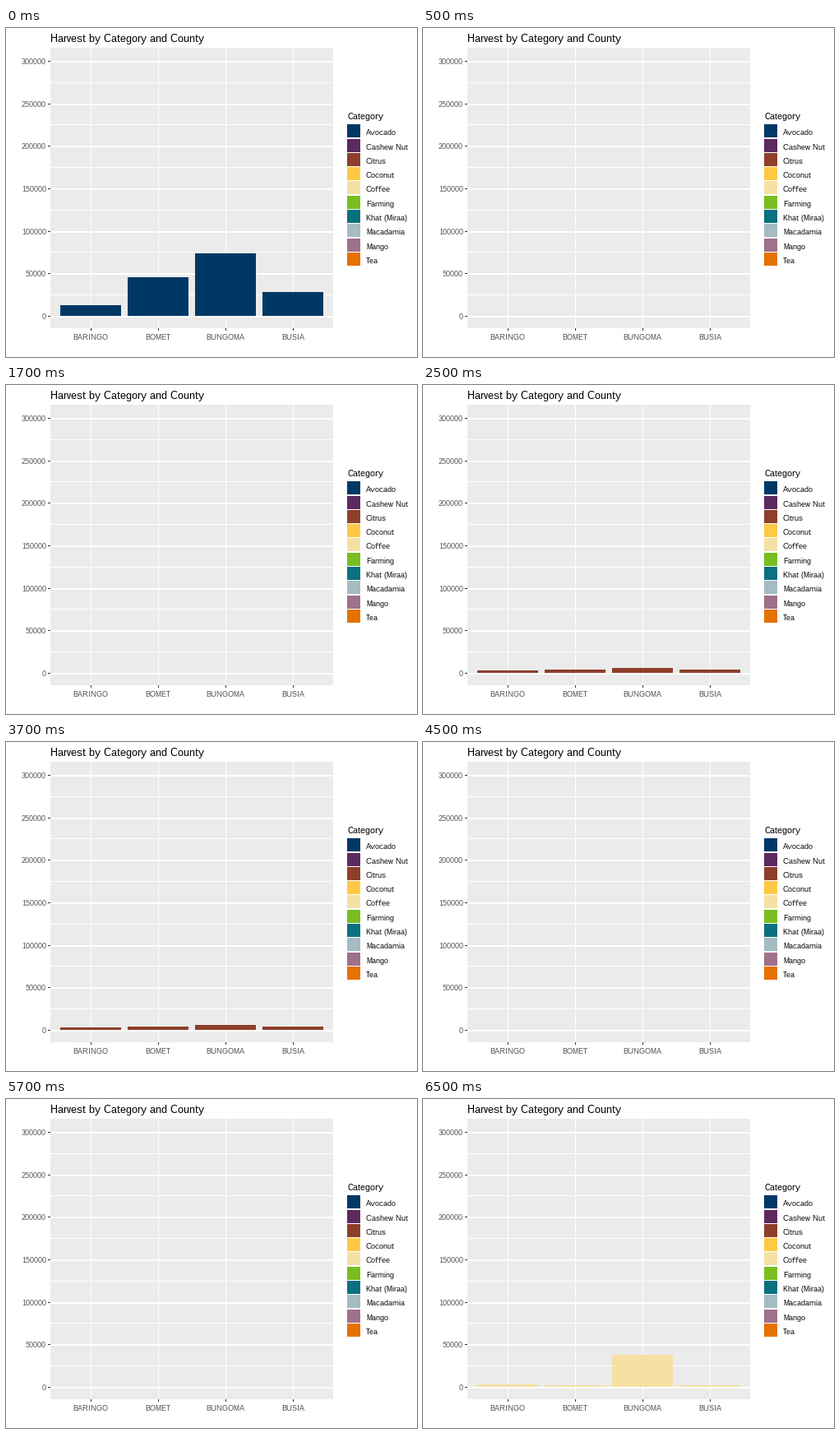
A matplotlib script for the animation above (8 s loop, 500x400 px).

```python
import matplotlib.pyplot as plt
from matplotlib.animation import FuncAnimation
from matplotlib.patches import Rectangle

plt.rcParams.update({"font.family": "Liberation Sans", "text.hinting": "default",
                     "text.hinting_factor": 1, "toolbar": "None"})

WIDTH, HEIGHT, DPI = 500, 400, 100
STEP_MS, STEPS = 500, 16
LEFT, TOP, RIGHT, BOTTOM = 54, 24, 398, 365
ZERO_Y, MAJOR_STEP = 350.5, 51.67

COUNTIES = ["BARINGO", "BOMET", "BUNGOMA", "BUSIA"]
PALETTE = {
    "Avocado": "#003865", "Cashew Nut": "#5D295F", "Citrus": "#8D3F2B",
    "Coconut": "#FFC845", "Coffee": "#F5E1A4", "Farming": "#78BE21",
    "Khat (Miraa)": "#0B7080", "Macadamia": "#A4BCC2", "Mango": "#A0708A",
    "Tea": "#E57200",
}
# start time, category, top edge of each county's bar
SCENES = [
    (0, "Avocado", (337, 303, 274, 321)),
    (500, "Cashew Nut", (350, 350, 350, 350)),
    (2500, "Citrus", (347, 346, 344, 346)),
    (4500, "Coconut", (350, 350, 350, 350)),
    (6500, "Coffee", (347, 348, 311, 348)),
]

fig = plt.figure(figsize=(WIDTH / DPI, HEIGHT / DPI), dpi=DPI, facecolor="white")
ax = fig.add_axes([0, 0, 1, 1])
ax.set(xlim=(0, WIDTH), ylim=(HEIGHT, 0))
ax.axis("off")


def box(x0, y0, x1, y1, color, z=1):
    patch = Rectangle((x0, y0), x1 - x0, y1 - y0, facecolor=color, linewidth=0,
                      antialiased=False, zorder=z)
    return ax.add_patch(patch)


def label(x, baseline, text, px, color="black", align="left"):
    ax.text(x, baseline, text, fontsize=px * 72 / DPI, color=color,
            ha=align, va="baseline", zorder=5)


def draw_panel():
    box(LEFT, TOP, RIGHT, BOTTOM, "#EBEBEB")
    for i in range(7):
        y = int(ZERO_Y - i * MAJOR_STEP)
        box(LEFT, y, RIGHT, y + 2, "white", 2)
        box(LEFT - 3, y, LEFT, y + 1, "#333333", 2)
        label(49, y + 4, str(i * 50000), 9, "#4D4D4D", "right")
        if i < 6:
            minor = int(ZERO_Y - (i + 0.5) * MAJOR_STEP)
            box(LEFT, minor, RIGHT, minor + 1, "white", 2)
    for i, county in enumerate(COUNTIES):
        x = 103 + 82 * i
        box(x, TOP, x + 1, BOTTOM, "white", 2)
        box(x, BOTTOM, x + 1, BOTTOM + 3, "#333333", 2)
        label(x, 379, county, 9, "#4D4D4D", "center")
    label(LEFT, 17, "Harvest by Category and County", 13)


def draw_legend():
    label(415, 111, "Category", 11)
    for i, (name, color) in enumerate(PALETTE.items()):
        y = round(117.3 + 17.28 * i)
        box(415, y, 431, y + 16, color)
        label(438, y + 13, name, 9)


draw_panel()
draw_legend()
bars = [box(66 + 82 * i, 350, 140 + 82 * i, 350, "white", 3) for i in range(4)]


def update(step):
    now = step * STEP_MS
    _, category, tops = [scene for scene in SCENES if scene[0] <= now][-1]
    for bar, top in zip(bars, tops):
        bar.set_y(top)
        bar.set_height(350 - top)
        bar.set_facecolor(PALETTE[category])
        bar.set_visible(top < 350)
    return bars


animation = FuncAnimation(fig, update, frames=STEPS, interval=STEP_MS,
                          repeat=True, repeat_delay=0, blit=False)
plt.show()
```
